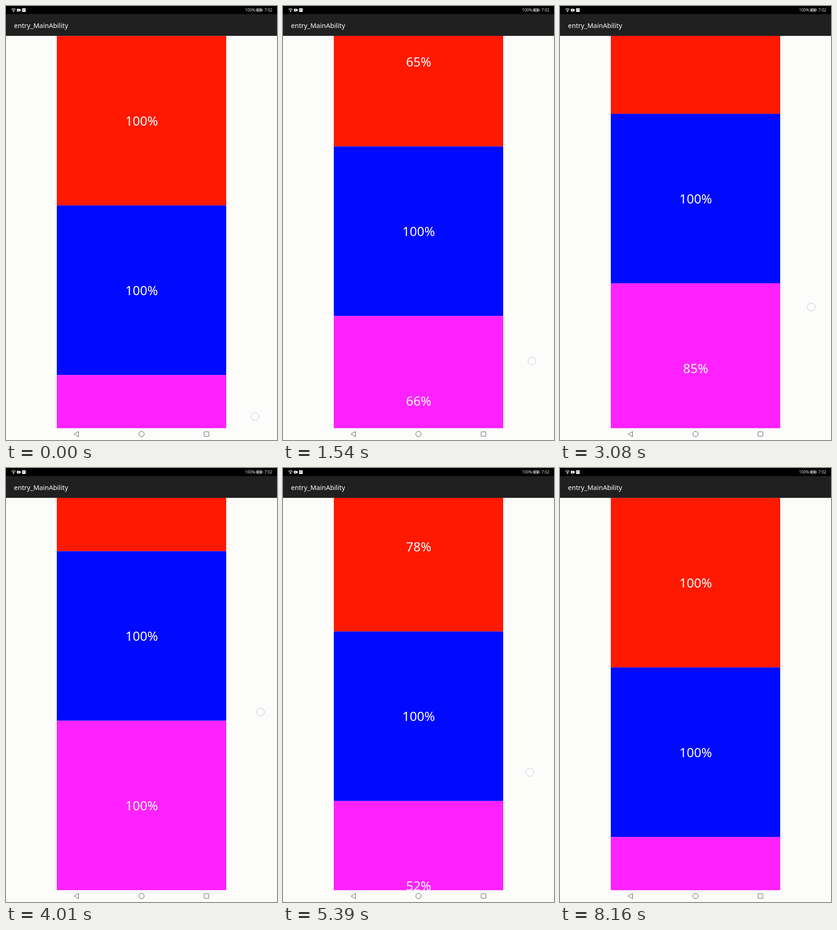
An HTML page for the animation above (8310 ms loop, 592 by 947 pixels).

```html
<!DOCTYPE html>
<html lang="en">
<head>
<meta charset="utf-8">
<title>Visible area list</title>
<style>
  html, body { margin: 0; width: 100%; height: 100%; overflow: hidden; background: #fff; }
  svg { display: block; width: 100%; height: 100%; }
  text { font-family: "Noto Sans", "Open Sans", sans-serif; fill: #fff; }
  .label { font-size: 28px; text-anchor: middle; }
  .status { font-size: 8.7px; fill: #e0e0e0; }
  .line { fill: none; stroke: #555; stroke-width: 1; stroke-linejoin: round; }
</style>
</head>
<body>
<svg viewBox="0 0 592 947">
  <defs><clipPath id="view"><rect x="0" y="65" width="592" height="856.2"/></clipPath></defs>
  <rect width="592" height="947" fill="#fcfcfb"/>
  <g clip-path="url(#view)"><g id="list"></g></g>

  <rect width="592" height="18" fill="#000"/>
  <rect y="17.7" width="592" height="47.5" fill="#202020"/>
  <text x="17.5" y="47.6" font-size="14.5">entry_MainAbility</text>

  <g fill="none" stroke="#eee" stroke-width="1.1">
    <path d="M11.8 7.6Q16.5 3.4 21.2 7.6M13.4 9.4Q16.5 6.7 19.6 9.4M14.9 11Q16.5 9.7 18.1 11"/>
    <circle cx="16.5" cy="12" r=".5"/>
  </g>
  <path d="M24.5 6h5q.8 0 .8.8v1l2-1.3v5l-2-1.3v1q0 .8-.8.8h-5q-.8 0-.8-.8V6.8q0-.8.8-.8z" fill="#eee"/>
  <circle cx="27" cy="9" r="1" fill="#000"/>
  <rect x="35" y="5" width="8" height="8" rx="1.2" fill="#eee"/>
  <text x="39" y="10.2" font-size="3.2" text-anchor="middle" style="fill:#444">APP</text>

  <text class="status" x="522.3" y="12.3">100%</text>
  <rect x="546.2" y="5.4" width="13.4" height="7" rx="1.6" fill="none" stroke="#aaa" stroke-width=".9"/>
  <rect x="547.6" y="6.8" width="10.6" height="4.2" rx=".6" fill="#bbb"/>
  <path d="M560.9 7.6v2.6" stroke="#aaa"/>
  <path d="M549.6 9.3l4-2.1-.5 1.4h3l-4 2.2.5-1.5z" fill="#000"/>
  <text class="status" x="564.6" y="12.3">7:02</text>

  <g class="line">
    <path d="M158.5 928.3V940L148.8 934.1z"/>
    <circle cx="296" cy="934" r="5.8"/>
    <rect x="432.8" y="929" width="10.4" height="10" rx=".6"/>
  </g>
  <circle id="touch" r="8.5" fill="#fff" fill-opacity=".5" stroke="#c2c4d8" stroke-width="1"/>
</svg>
<script>
const LOOP = 8310, FRAMES = 54, STEP = LOOP / FRAMES;
const TOP = 65.2, VIEW = 856, SIZE = 370;
const COLORS = ["#ff1900", "#000aff", "#ff22ff"];
const LIFT = 51;

// [frame, value] points
const scrollKeys = [[0, 0], [5, 47], [13, 167], [20, 200], [26, 253.7], [28, 254], [35, 78.5], [39.5, 0], [54, 0]];
const fingerX = [[0, 544], [5, 546], [13, 542.5], [20, 549], [26, 556], [28, 555], [35, 539], [50, 547], [54, 547]];
const fingerY = [[0, 896], [5, 852], [13, 729], [20, 657], [26, 532.5], [28, 489], [35, 664], [39.5, 742], [50, 890], [54, 890]];

// Monotone cubic curve through the points
function curve(keys) {
  const rise = i => (keys[i + 1][1] - keys[i][1]) / (keys[i + 1][0] - keys[i][0]);
  const last = keys.length - 1;
  const slopes = keys.map((_, i) => {
    if (i === 0) return rise(0) * 0.6;
    if (i === last) return rise(last - 1);
    const a = rise(i - 1), b = rise(i);
    return a * b <= 0 ? 0 : 2 * a * b / (a + b);
  });
  return x => {
    let i = 0;
    while (i < last - 1 && x >= keys[i + 1][0]) i++;
    const [x0, y0] = keys[i], [x1, y1] = keys[i + 1];
    const w = x1 - x0, u = (x - x0) / w, v = 1 - u;
    return y0 * v * v * (1 + 2 * u) + y1 * u * u * (3 - 2 * u)
      + w * u * v * (slopes[i] * v - slopes[i + 1] * u);
  };
}

const scrollAt = curve(scrollKeys), touchX = curve(fingerX), touchY = curve(fingerY);
const list = document.getElementById("list");
const touch = document.getElementById("touch");

function add(tag, attrs) {
  const el = document.createElementNS("http://www.w3.org/2000/svg", tag);
  for (const name in attrs) el.setAttribute(name, attrs[name]);
  return list.appendChild(el);
}

const labels = COLORS.map((fill, i) => {
  add("rect", { x: 111, y: TOP + i * SIZE, width: 370, height: SIZE, fill });
  return add("text", { class: "label", x: 296.3, y: TOP + i * SIZE + 195.6 });
});

function draw(time) {
  const frame = Math.floor((time % LOOP + 5) / STEP) % FRAMES;
  const scroll = scrollAt(frame);
  list.setAttribute("transform", `translate(0 ${-scroll})`);
  labels.forEach((label, i) => {
    const y = i * SIZE - scroll;
    const shown = Math.min(y + SIZE, VIEW) - Math.max(y, 0);
    label.textContent = Math.floor(shown / SIZE * 100 + 0.1) + "%";
  });
  touch.setAttribute("cx", touchX(frame));
  touch.setAttribute("cy", touchY(frame));
  touch.setAttribute("visibility", frame < LIFT ? "visible" : "hidden");
}

const start = performance.now();
function tick() {
  draw(performance.now() - start);
  requestAnimationFrame(tick);
}
tick();
</script>
</body>
</html>
```
